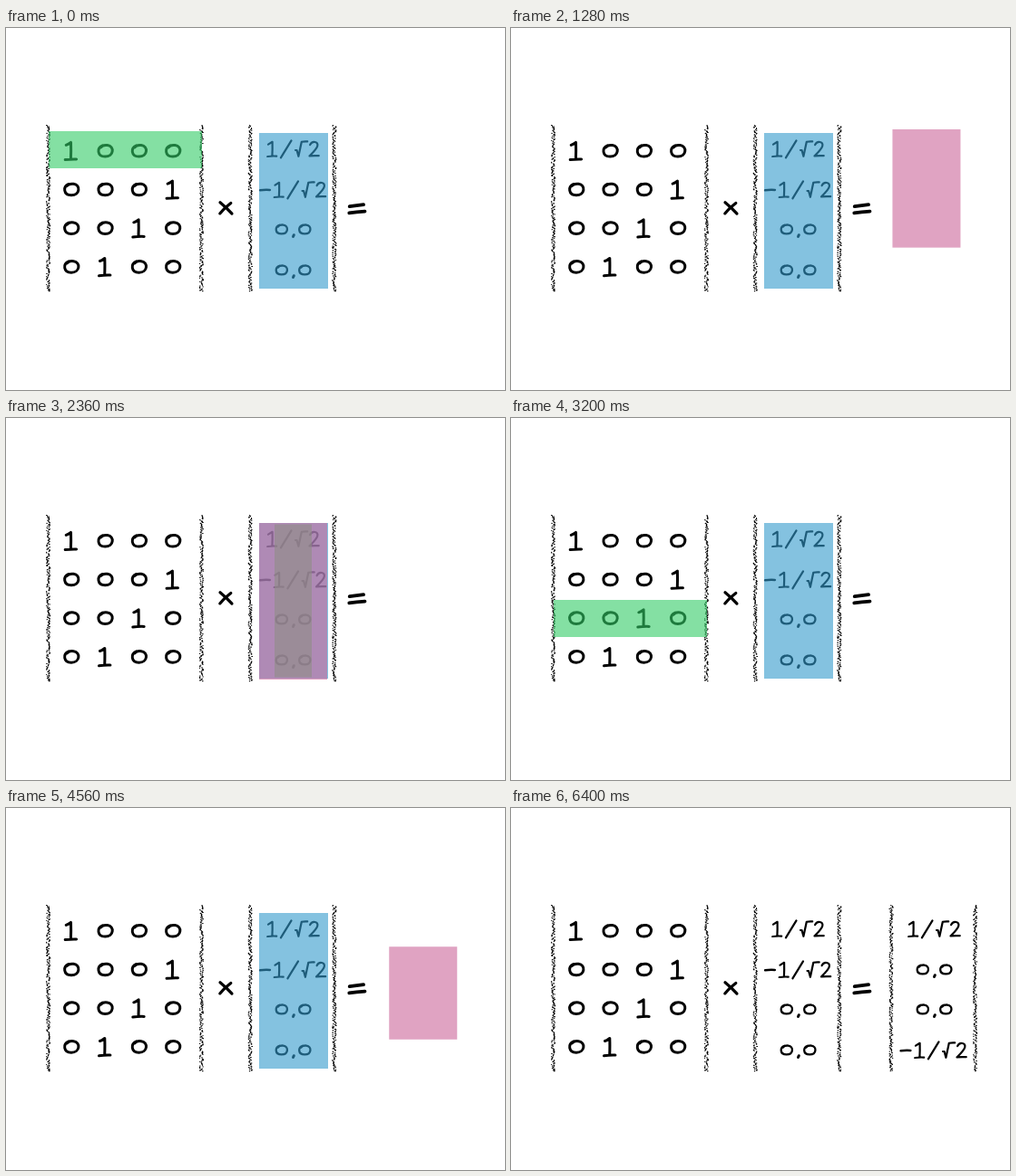
Write an HTML page that moves like this. It is 550 px wide and 400 px high and loops after 7 s.

```html
<!DOCTYPE html>
<html lang="en">
<head>
<meta charset="utf-8">
<title>Matrix times vector</title>
<style>
html, body { margin: 0; width: 100%; height: 100%; overflow: hidden; background: #fff; }
svg { display: block; width: 550px; height: 400px; }
.ink { fill: none; stroke: #000; stroke-linecap: round; stroke-linejoin: round; }
.wash { fill-opacity: .6; }
</style>
</head>
<body>
<svg viewBox="0 0 550 400" role="img" aria-label="A 4 by 4 matrix times a vector equals a vector">
  <g id="sum"></g>
  <g id="result"></g>
  <g id="washes" class="wash">
    <rect x="279" y="116" width="76" height="172" fill="#3399cc"/>
    <rect id="row" x="-84.5" y="-20.5" width="169" height="41" fill="#33cc66"/>
    <rect id="cell" fill="#cc6699"/>
  </g>
</svg>
<script>
const $ = id => document.getElementById(id);
const sum = $('sum'), result = $('result'), washes = $('washes'), row = $('row'), cell = $('cell');

// Pen strokes, each glyph centred on 0,0
const GLYPHS = {
  '1': 'M-5-6.4Q-2-7.4 .3-9.4Q.6 0 .2 9.2M-6 9.8Q0 9 6.4 9.2',
  '0': 'M-3.4-6C-10-3.4-9.4 6.2-.6 6.3C9.2 6.4 10-5.2 2-6.2C-1-6.6-4-5.8-5.2-4',
  's1': 'M-4-5.4L.6-8.2Q.8 0 .4 7.6M-4.8 8Q0 7.3 5.2 7.6',
  's0': 'M-2-4.8C-8-3-8 4.8-.4 4.9C7.6 5 7.8-4 1.6-4.9C-1-5.2-3-4.6-4-3',
  '/': 'M-5.6 9.4L6-9.6',
  'r': 'M-6 1L-4.4 1.2L-2.6 7.8L.8-8.2Q4-8.9 7.2-8.6',
  '2': 'M-4.4-4.8C-2.4-9.6 5-8.8 3.8-3.8C3-.4-1.6 4-5 7.4Q0 6.8 5.2 7.2',
  '.': 'M.3-.8L-.5 1',
  '-': 'M-5.4 .3Q0-.4 5.4 0',
  'x': 'M-6-5.8Q1 0 7 6.6M5.8-5Q-1 0-6.2 6.4',
  '=': 'M-7.8-1.8Q0-3 7.6-3.8M-8.2 5.4Q0 4 9 3.6'
};

function path(parent, d, width) {
  const p = document.createElementNS('http://www.w3.org/2000/svg', 'path');
  p.setAttribute('class', 'ink');
  p.setAttribute('d', d);
  p.setAttribute('stroke-width', width);
  parent.append(p);
  return p;
}

function glyph(parent, name, x, y, width) {
  path(parent, GLYPHS[name], width).setAttribute('transform', `translate(${x} ${y})`);
}

function root(parent, x, y) {
  [['s1', 293], ['/', 308.5], ['r', 325], ['2', 339.5]]
    .forEach(([g, gx]) => glyph(parent, g, gx + x, y, 2.2));
}

function minusRoot(parent, x, y) {
  glyph(parent, '-', 285.5 + x, y + .5, 2.5);
  root(parent, 7.5 + x, y + .5);
}

function zero(parent, x, y) {
  glyph(parent, 's0', 304 + x, y, 2.3);
  glyph(parent, '.', 317 + x, y + 7, 3);
  glyph(parent, 's0', 329.5 + x, y, 2.3);
}

let seed = 7;
const rand = () => (seed = seed * 16807 % 2147483647) / 2147483647;

// Rough charcoal bar built from short dabs
function bar(parent, x) {
  let d = '';
  for (let y = 107.5; y < 291.5; y += .8) {
    const dx = (rand() - .5) * 3.6;
    d += `M${(x + dx).toFixed(1)} ${y.toFixed(1)}h${(rand() * .8).toFixed(1)}`;
  }
  path(parent, d, 1.2);
}

['1000', '0001', '0010', '0100'].forEach((line, r) =>
  [...line].forEach((c, i) =>
    glyph(sum, c, (c === '1' ? 71.2 : 72.5) + 37.3 * i, 135.8 + 42.7 * r, 3)));
glyph(sum, 'x', 242, 198.5, 3.2);
glyph(sum, '=', 386.5, 199, 3.8);
root(sum, 0, 134);
minusRoot(sum, 0, 178.5);
zero(sum, 0, 222.5);
zero(sum, 0, 267.5);
[46.3, 215.3, 269, 361.6].forEach(x => bar(sum, x));

root(result, 150, 134);
zero(result, 150, 178.5);
zero(result, 150, 222.5);
minusRoot(result, 149.5, 267.5);
[418.8, 511.3].forEach(x => bar(result, x));

const FRAME = 40, ROW = 1600, SHOW = 6400, LOOP = 7000;
const DRIFT = [141, 141.5, 142.5, 140];

const set = (el, attrs) => { for (const k in attrs) el.setAttribute(k, attrs[k]); };
const ramp = (t, from, to) => Math.min(1, Math.max(0, (t - from) / (to - from)));
const mix = (a, b, p) => a + (b - a) * p;

// The row swings upright onto the vector
function drawRow(n, t) {
  const p = ramp(t, 0, 360);
  set(row, {
    transform: `translate(${mix(131.5, 316.5, p)} ${mix(134.5 + 43.5 * n, 202, p)}) rotate(${90 * p})`,
    opacity: t > 760 ? 0 : 1
  });
}

// The product fades in, slides right and shrinks
function drawCell(n, t) {
  const slide = ramp(t, 760, 1160), shrink = ramp(t, 1160, 1560);
  set(cell, {
    x: 279 + DRIFT[n] * slide + 1.5 * shrink,
    y: mix(116, 102.5 + 44 * n, shrink),
    width: 75,
    height: mix(173, 32, shrink),
    opacity: ramp(t, 360, 760)
  });
}

function draw(now) {
  const t = Math.floor(now % LOOP / FRAME) * FRAME;
  const done = t >= SHOW;
  result.style.display = done ? '' : 'none';
  washes.style.display = done ? 'none' : '';
  if (done) return;
  const n = Math.floor(t / ROW);
  drawRow(n, t % ROW);
  drawCell(n, t % ROW);
}

function tick() {
  draw(performance.now());
  requestAnimationFrame(tick);
}
tick();
</script>
</body>
</html>
```
